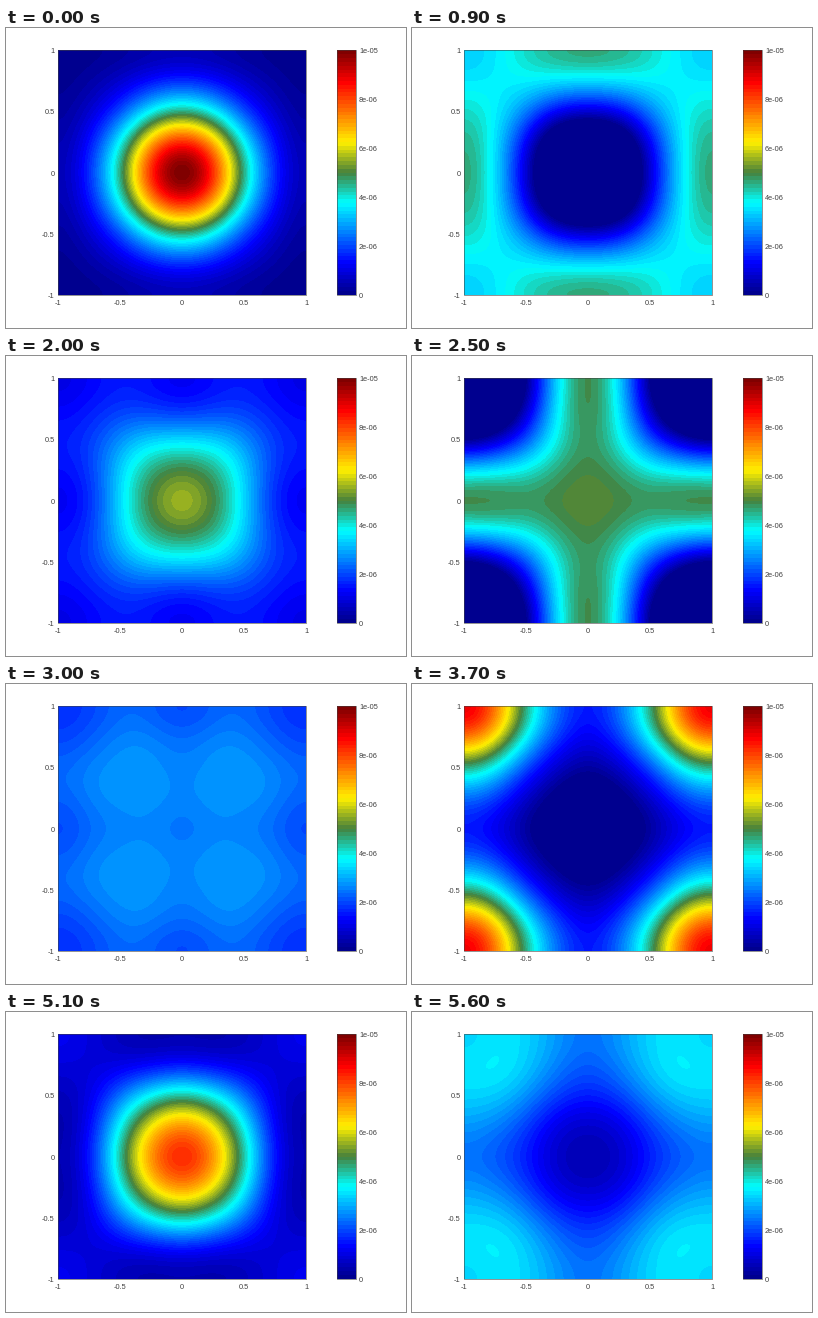
Write a matplotlib script that moves like this. It is 400x300 px and loops after 5700 ms.

```python
import numpy as np
import matplotlib.pyplot as plt
from matplotlib.animation import FuncAnimation
from matplotlib.colors import LinearSegmentedColormap
from matplotlib.patches import Rectangle

W, H = 400, 300
FRAMES, INTERVAL = 57, 100
PHASE_STEP = 0.0825 * np.pi
SPREAD = 0.32          # squared width of the initial bump
MODES = 5
INK = "#404040"

LEFT, RIGHT, TOP, BOTTOM = 52, 300, 22, 267
BAR_LEFT, BAR_RIGHT = 331, 350

cmap = LinearSegmentedColormap.from_list("heat", [
    (0, "#00008f"), (0.125, "#0000ff"), (0.375, "#00ffff"), (0.5, "#46803c"),
    (0.625, "#fff000"), (0.875, "#ff0000"), (1, "#800000")], N=64)

fig = plt.figure(figsize=(W / 100, H / 100), dpi=100, facecolor="white")
ax = fig.add_axes([0, 0, 1, 1])
ax.set_xlim(0, W)
ax.set_ylim(H, 0)
ax.axis("off")


def cosine_modes():
    """Cosine series of a Gaussian between reflecting walls at -1 and 1."""
    m = np.arange(MODES)
    s = np.linspace(-1, 1, 2001)
    g = np.exp(-s**2 / SPREAD)
    basis = np.cos(np.pi * np.outer(m, s))
    amp = (basis * g).mean(axis=1) * np.where(m == 0, 1, 2)
    return np.outer(amp, amp), np.hypot.outer(m, m)


def samples(n):
    x = -1 + (2 * np.arange(n) + 1) / n
    return np.cos(np.pi * np.outer(np.arange(MODES), x))


amp, freq = cosine_modes()
cos_x, cos_y = samples(RIGHT - LEFT), samples(BOTTOM - TOP)


def wave(i):
    return cos_y.T @ (amp * np.cos(freq * PHASE_STEP * i)) @ cos_x


def show(data, x0, x1):
    return ax.imshow(data, cmap=cmap, vmin=0, vmax=1, aspect="auto",
                     interpolation="nearest", extent=(x0, x1, BOTTOM, TOP))


def frame_box(x0, x1):
    ax.add_patch(Rectangle((x0, TOP), x1 - x0, BOTTOM - TOP, fill=False,
                           ec=INK, lw=0.4, zorder=3))


def label(x, y, text, ha):
    ax.text(x, y, text, ha=ha, va="center_baseline", color=INK,
            fontsize=5.3, family="Liberation Sans")


field = show(wave(0), LEFT, RIGHT)
show(np.linspace(1, 0, BOTTOM - TOP)[:, None], BAR_LEFT, BAR_RIGHT)
ax.set_xlim(0, W)
ax.set_ylim(H, 0)
frame_box(LEFT, RIGHT)
frame_box(BAR_LEFT, BAR_RIGHT)

for k, text in enumerate(["-1", "-0.5", "0", "0.5", "1"]):
    label(LEFT + (RIGHT - LEFT) * k / 4, 274.5, text, "center")
    label(48.5, BOTTOM - (BOTTOM - TOP) * k / 4 + 0.5, text, "right")
for k, text in enumerate(["0", "2e-06", "4e-06", "6e-06", "8e-06", "1e-05"]):
    label(353, BOTTOM - (BOTTOM - TOP) * k / 5 + 0.5, text, "left")


def update(i):
    field.set_data(wave(i))
    return [field]


anim = FuncAnimation(fig, update, frames=FRAMES, interval=INTERVAL,
                     repeat=True, repeat_delay=0, blit=False)
plt.show()
```
